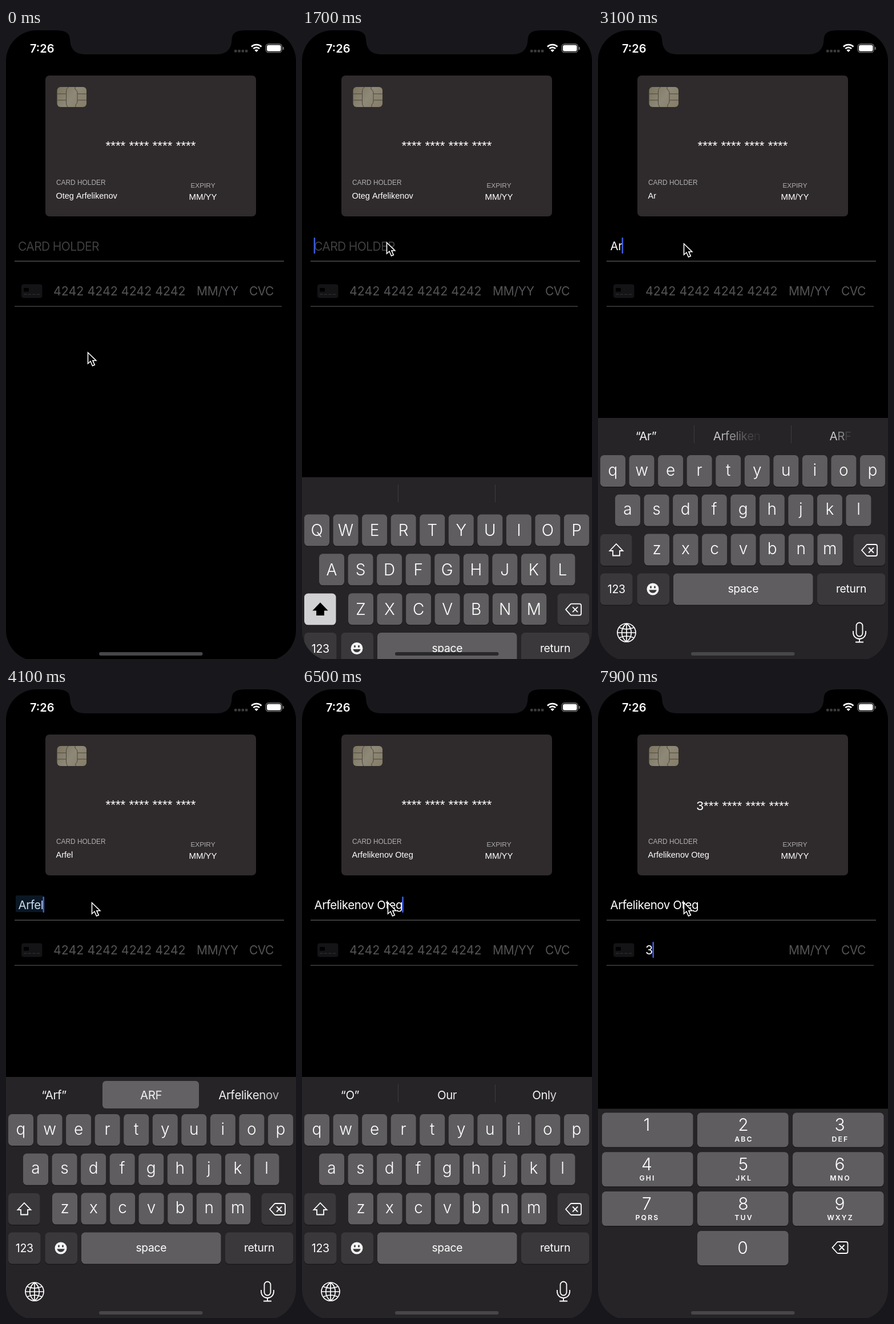
These frames come from a looping animation (508 px wide and 1102 px high, 8 s). An HTML page with a canvas:

```html
<!DOCTYPE html>
<html lang="en">
<head>
<meta charset="utf-8">
<title>Card form</title>
<style>
html, body { margin: 0; width: 100%; height: 100%; overflow: hidden; background: #000; }
canvas { display: block; width: 508px; height: 1102px; }
</style>
</head>
<body>
<canvas id="stage" width="508" height="1102"></canvas>
<script>
const ctx = document.getElementById('stage').getContext('2d');
const W = 508, H = 1102, LOOP = 8000, STEP = 100;
const UI = 'Inter, sans-serif', CARD = '"Liberation Sans", Arial, sans-serif';
const PANEL = '#262427', KEY = '#5f5d60', DARK_KEY = '#3a383b', CARET = '#3d5cdd';
const SURNAME = 'Arfelikenov', FIRST = 'Oteg', FULL = `${SURNAME} ${FIRST}`;
// Moment at which each character of FULL has been typed
const TYPED = [2800, 3000, 3300, 3700, 4000, 4400, 4600, 4800, 4900, 5100, 5200, 5600, 6000, 6300, 6400, 6500];
const SUGGESTIONS = [
  [2800, '“A”', 'And', 'Are'],
  [3000, '“Ar”', SURNAME, 'ARF'],
  [3400, '“Arf”', 'ARF', ''],
  [3900, '“Arf”', 'ARF', SURNAME],
  [4300, '“Arf”', 'ARF', ''],
  [4400, '“Arfel”', SURNAME, ''],
  [4800, '“Arfelik”', SURNAME, ''],
  [5200, `“${SURNAME}”`, SURNAME, ''],
  [5600, 'the', 'and', 'is'],
  [6300, '“O”', 'Our', 'Only'],
];
const POINTER = [[400, 154, 483], [700, 159, 440], [1000, 154, 392], [1300, 148, 374], [1800, 148, 374], [2000, 150, 376]];

const clamp = v => Math.max(0, Math.min(1, v));
const mix = (a, b, k) => a + (b - a) * k;
const isMarked = t => t >= 3400 && t < 4400;

function box(x, y, w, h, r, fill) {
  ctx.fillStyle = fill;
  ctx.beginPath();
  ctx.roundRect(x, y, w, h, r);
  ctx.fill();
}

function line(d, color, width, fill) {
  const p = new Path2D(d);
  if (fill) { ctx.fillStyle = fill; ctx.fill(p); }
  ctx.strokeStyle = color;
  ctx.lineWidth = width;
  ctx.stroke(p);
}

function at(x, y, draw) {
  ctx.save();
  ctx.translate(x, y);
  draw();
  ctx.restore();
}

function faded(alpha, draw) {
  ctx.save();
  ctx.globalAlpha *= alpha;
  draw();
  ctx.restore();
}

function text(s, x, y, size, { fill = '#fff', align = 'left', weight = 400, family = UI, track = 0 } = {}) {
  ctx.font = `${weight} ${size}px ${family}`;
  ctx.letterSpacing = `${track * size}px`;
  ctx.textAlign = align;
  ctx.fillStyle = fill;
  ctx.fillText(s, x, y);
  return ctx.measureText(s).width;
}

function statusBar() {
  text('7:26', 42, 42.5, 20, { weight: 600 });
  for (let i = 0; i < 4; i++) box(400 + i * 6.3, 38, 4.5, 4.5, 1, '#3b3b3d');
  ctx.strokeStyle = ctx.fillStyle = '#fff';
  ctx.lineWidth = 2.8;
  for (const r of [7.6, 12.3]) {
    ctx.beginPath();
    ctx.arc(438.7, 41.5, r, -Math.PI * 0.75, -Math.PI * 0.25);
    ctx.stroke();
  }
  ctx.beginPath();
  ctx.moveTo(438.7, 42);
  ctx.arc(438.7, 42, 4.6, -Math.PI * 0.75, -Math.PI * 0.25);
  ctx.fill();
  ctx.strokeStyle = '#77777a';
  ctx.lineWidth = 1.3;
  ctx.beginPath();
  ctx.roundRect(455.2, 28, 28, 14.6, 4.5);
  ctx.stroke();
  box(457, 29.8, 24.5, 11, 3, '#fff');
  box(484.8, 33, 2, 5, 1, '#77777a');
}

function chip() {
  const gold = ctx.createLinearGradient(90, 103, 141, 138);
  gold.addColorStop(0, '#7b745f');
  gold.addColorStop(0.5, '#8e8878');
  gold.addColorStop(1, '#857d66');
  box(89.5, 103, 51.5, 35, 6, gold);
  line('M90 115H105.5M90 126H105.5M125 115H141M125 126H141' +
    'M109 103Q105.500 106 105.500 111V130Q105.500 135 108 138M121 103V107Q125 109 125 113V128Q125 132 122 134V138', '#4a4638', 1);
}

function card(holder, digit) {
  box(69, 83, 369, 246, 7, '#2f2b2c');
  chip();
  text(`${digit || '*'}*** **** **** ****`, 253.5, digit ? 214.5 : 213, 22.4, { align: 'center', family: CARD });
  const label = { fill: '#b0aeb1', family: CARD }, centered = { align: 'center', family: CARD };
  text('CARD HOLDER', 88, 273.5, 11.9, label);
  text(holder, 87.5, 298, 14.5, { family: CARD });
  text('EXPIRY', 345, 279, 11.8, { ...label, align: 'center' });
  text('MM/YY', 345, 300, 15, centered);
}

function caret(x, y, h, t) {
  const blink = mid => clamp((Math.abs(t - mid) - 60) / 120);
  faded(blink(2450) * blink(7570), () => box(x, y, 2.6, h, 1, CARET));
}

function form(t, name, digit) {
  const style = { track: -0.022, fill: isMarked(t) ? '#c6dcf0' : '#fff' };
  let end = 0;
  if (name) {
    if (isMarked(t)) {
      ctx.font = `400 20.5px ${UI}`;
      ctx.letterSpacing = `${-0.022 * 20.5}px`;
      box(17, 364, 4 + ctx.measureText(name).width, 29, 2, '#0b1724');
    }
    end = text(name, 21.5, 387.5, 20.5, style);
  } else {
    text('CARD HOLDER', 21, 389, 21, { fill: '#3f3f41', track: -0.03 });
  }
  if (t >= 1500 && t < 6800) caret(20.6 + end, 366, 28, t);

  box(15, 406.6, 472, 1.4, 0, '#4d4d4f');
  box(15, 485.4, 468, 1.4, 0, '#4d4d4f');
  box(27, 447.5, 36.5, 24, 4, '#141316');
  box(31, 454, 9, 6.5, 1, '#000');
  for (let i = 0; i < 4; i++) box(31 + i * 7.6, 464.5, 5.5, 1.5, 0, '#29282b');

  const hint = { fill: '#545456', track: -0.012 };
  const width = digit ? text(digit, 83, 467, 21.4) : 0;
  if (!digit) text('4242 4242 4242 4242', 83, 467, 21.4, { fill: '#545456' });
  text('MM/YY', 334, 467, 21, hint);
  text('CVC', 426, 467, 21, { ...hint, track: -0.025 });
  if (t >= 6800) caret(82.2 + width, 445, 28, t);
}

function key(x, y, w, h, fill = KEY) {
  box(x, y + 1.5, w, h, 6.5, '#1a181a');
  box(x, y, w, h, 6.5, fill);
}

function backspace(x, y) {
  at(x, y, () => {
    line('M-13.5 0L-5.5 -9Q-4.6 -10 -3.5 -10H10.5Q13.5 -10 13.5 -7V7Q13.5 10 10.5 10H-3.5Q-4.6 10 -5.5 9Z', '#fff', 1.8);
    line('M-1.5 -4.5L7.5 4.5M7.5 -4.5L-1.5 4.5', '#fff', 1.8);
  });
}

function suggestions(t) {
  const row = SUGGESTIONS.findLast(r => t >= r[0]);
  if (isMarked(t)) box(169, 688, 169, 48, 6, '#636164');
  else [168, 338].forEach(x => box(x, 694, 1, 31, 0, '#3d3c40'));
  if (!row) return;
  const style = { track: -0.022, fill: '#f2f2f4' };
  text(row[1], 84, 720, 20.5, { ...style, align: 'center' });
  // Words appear letter by letter, fading in from the left
  const progress = (t - row[0]) / 200 * 1.6;
  [row[2], row[3]].forEach((word, slot) => {
    let x = (slot ? 424.5 : 254) - text(word, -900, 0, 20.5, style) / 2;
    [...word].forEach((ch, i) => faded(clamp(progress - i / word.length), () => {
      x += text(ch, x, 720, 20.5, style);
    }));
  });
}

function smiley(x, y) {
  at(x, y, () => {
    box(-10.5, -10.5, 21, 21, 10.5, '#f4f4f5');
    box(-4.8, -5.5, 2.6, 4, 1.3, DARK_KEY);
    box(2.2, -5.5, 2.6, 4, 1.3, DARK_KEY);
    line('M-6.5 1.5H6.5Q5 6.5 0 6.5T-6.5 1.5Z', DARK_KEY, 0.3, DARK_KEY);
  });
}

function globeAndMic() {
  at(50, 1056, () => line('M-16 0A16 16 0 1 0 16 0A16 16 0 1 0 -16 0ZM-16 0H16M0 -16V16' +
    'M0 -16C-11 -8 -11 8 0 16M0 -16C11 -8 11 8 0 16M-13 -9Q0 -3 13 -9M-13 9Q0 3 13 9', '#fff', 1.7));
  at(458, 1055, () => {
    line('M-5.5 -11A5.5 5.5 0 0 1 5.5 -11V2A5.5 5.5 0 0 1 -5.5 2Z', '#fff', 1.8);
    line('M-11 -2V1A11 11 0 0 0 11 1V-2M0 12V17.5M-7 17.5H7', '#fff', 1.8);
  });
}

function letterKeyboard(t) {
  const upper = t < TYPED[0], style = { align: 'center', weight: 300 };
  suggestions(t);
  [['qwertyuiop', 4], ['asdfghjkl', 30], ['zxcvbnm', 81]].forEach(([letters, left], row) => {
    const y = 746 + row * 68.8;
    [...letters].forEach((ch, i) => {
      const x = left + i * 50.55;
      key(x, y, 44, 55);
      text(upper ? ch.toUpperCase() : ch, x + 22, y + (upper ? 37.5 : 35.5), 28, style);
    });
  });
  key(4, 884, 55.5, 55, upper ? '#d1d1d3' : DARK_KEY);
  at(32, 912, () => line('M0 -11L11.5 1H6V9.5H-6V1H-11.5Z', upper ? '#000' : '#fff', 1.8, upper && '#000'));
  key(447.5, 884, 55.5, 55, DARK_KEY);
  backspace(475.5, 912);
  key(4, 952.5, 56.5, 55, DARK_KEY);
  key(68.5, 952.5, 56.5, 55, DARK_KEY);
  key(132, 952.5, 244.5, 55);
  key(384, 952.5, 119, 55, DARK_KEY);
  const caption = { align: 'center', track: -0.015 };
  text('123', 32.3, 987, 19.5, caption);
  text('space', 254.3, 986, 19.3, caption);
  text('return', 443.5, 986, 19.3, caption);
  smiley(96, 980);
  globeAndMic();
}

function numberPad() {
  const letters = ['', 'ABC', 'DEF', 'GHI', 'JKL', 'MNO', 'PQRS', 'TUV', 'WXYZ'];
  const digitStyle = { align: 'center', weight: 300 };
  letters.forEach((label, i) => {
    const column = i % 3, y = 743.5 + Math.floor(i / 3) * 68.8, center = 85.5 + column * 169;
    key(7 + column * 167, y, 159.5, 60);
    text(i + 1, center, y + 31.5, 30, digitStyle);
    text(label, center + 1, y + 50, 12.3, { align: 'center', weight: 600, track: 0.17 });
  });
  key(174, 950, 159.5, 60);
  text('0', 253.5, 989.5, 30, digitStyle);
  backspace(424, 979);
}

function keyboard(t) {
  if (t < 1600) return 0;
  // Critically damped slide from below the screen
  const spring = 18.1 * (t - 1550) / 1000;
  const drop = 421 * (1 + spring) * Math.exp(-spring);
  const swap = clamp((t - 6800) / 300);
  at(0, drop, () => {
    const top = mix(681, 736.5, swap);
    box(0, top, W, H - top, 0, PANEL);
    if (swap < 1) faded(1 - swap, () => letterKeyboard(t));
    if (swap > 0) faded(swap, numberPad);
  });
  return drop;
}

function bezel() {
  ctx.fillStyle = '#18171b';
  ctx.beginPath();
  ctx.rect(0, 0, W, H + 3.5);
  ctx.roundRect(0, 4, W, H - 0.5, 54);
  ctx.fill('evenodd');
  ctx.fill(new Path2D('M92 3V4.5Q111.500 4.500 112 20Q113 46 138 46H370Q395 45 395.500 20Q396 4.500 415 4.500V3Z'));
}

function pointer(t) {
  let [, x, y] = t < 100 ? [0, 143, 566] : POINTER[0];
  for (let i = 1; i < POINTER.length; i++) {
    const [t0, x0, y0] = POINTER[i - 1], [t1, x1, y1] = POINTER[i];
    if (t <= t0) break;
    const k = clamp((t - t0) / (t1 - t0));
    x = mix(x0, x1, k);
    y = mix(y0, y1, k);
  }
  at(x, y, () => line('M0.500 0.800V20L5 16L8.500 24L12.300 22.300L8.900 14.700H14.800Z', '#fff', 1.6, '#000'));
}

function draw(t) {
  ctx.fillStyle = '#000';
  ctx.fillRect(0, 0, W, H);
  const name = FULL.slice(0, TYPED.filter(moment => t >= moment).length);
  const digit = t >= 7900 ? '3' : '';
  card(name || `${FIRST} ${SURNAME}`, digit);
  form(t, name, digit);
  const drop = keyboard(t);
  bezel();
  statusBar();
  box(163, 1090, 181.5, 6, 3, drop > 20 ? '#29282b' : '#474649');
  pointer(t);
}

function frame(now) {
  draw(Math.floor(now % LOOP / STEP) * STEP);
  requestAnimationFrame(frame);
}
requestAnimationFrame(frame);
</script>
</body>
</html>
```
